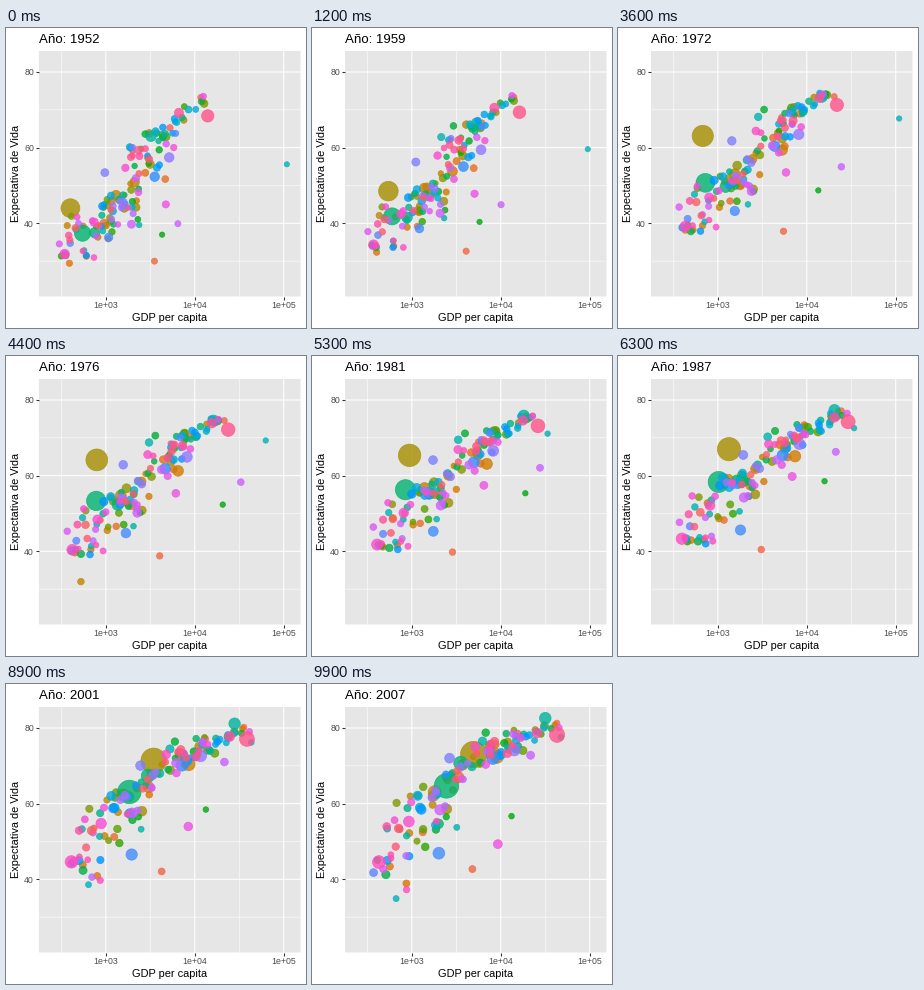
These frames come from a looping animation (300x300 px, 10000 ms). A matplotlib script:

```python
import matplotlib.pyplot as plt
import numpy as np
from matplotlib.animation import FuncAnimation

COUNTRIES, FRAMES = 142, 100
LAST = 11                      # eleven five-year rounds after 1952
PX = 0.72                      # points per pixel at 100 dpi
rng = np.random.default_rng(7)
rounds = np.arange(LAST + 1)
tracks = {}


def hcl(hue, chroma=100, lum=65, gamma=1.25):
    """Polar CIE-LUV colour as clipped RGB, darkened by the display gamma."""
    h = np.radians(hue)
    u = chroma * np.cos(h) / (13 * lum) + 0.1978
    v = chroma * np.sin(h) / (13 * lum) + 0.4683
    y = ((lum + 16) / 116) ** 3
    x, z = 9 * y * u / (4 * v), y * (12 - 3 * u - 20 * v) / (4 * v)
    rgb = np.array([3.2405 * x - 1.5371 * y - 0.4985 * z,
                    -0.9693 * x + 1.8760 * y + 0.0416 * z,
                    0.0556 * x - 0.2040 * y + 1.0572 * z]).clip(0, 1)
    srgb = np.where(rgb > 0.0031308, 1.055 * rgb ** (1 / 2.4) - 0.055, 12.92 * rgb)
    return srgb ** gamma


def diameter(pop):
    """Bubble diameter in pixels for a population in millions."""
    size = 2 + 10 * np.sqrt(pop / 1318)
    return 0.75 * (size * 2.845 + 0.945)


def store(rank, pops, at, log_gdp, life):
    tracks[rank] = (np.interp(rounds, at, log_gdp), np.interp(rounds, at, life),
                    diameter(np.geomspace(*pops, len(rounds))))


def landmark(rank, pop0, pop1, *keys):
    """A recognisable bubble; each key is (round, gdp, life)."""
    at, gdp, life = zip(*keys)
    store(rank, (pop0, pop1), at, np.log10(gdp), life)


# Giants
landmark(25, 556, 1318, (0, 400, 44), (1, 576, 50.5), (2, 488, 44.5), (3, 613, 58.4),
         (4, 677, 63.1), (6, 962, 65.5), (11, 4959, 73))
landmark(59, 372, 1110, (0, 547, 37.4), (4, 724, 50.7), (6, 856, 56.6), (9, 1459, 61.8),
         (11, 2452, 64.7))
landmark(135, 158, 301, (0, 13990, 68.4), (4, 21806, 71.3), (11, 42952, 78.2))
landmark(67, 86, 127, (0, 3217, 63), (4, 14779, 73.4), (11, 31656, 82.6))
landmark(60, 82, 224, (0, 750, 37.5), (5, 1383, 52.7), (11, 3541, 70.7))
landmark(15, 57, 190, (0, 2109, 50.9), (5, 6660, 61.5), (11, 9066, 72.4))
landmark(95, 33, 135, (0, 1077, 36.3), (5, 1700, 45), (11, 2014, 46.9))

# Loners far from the crowd
landmark(72, 0.2, 2.5, (0, 108382, 55.6), (3, 80895, 64.6), (4, 109348, 67.7),
         (6, 31354, 71.3), (11, 47307, 77.6))
landmark(108, 2.5, 8.9, (0, 493, 40), (7, 848, 44), (8, 737, 23.6), (9, 590, 36.1),
         (11, 863, 46.2))
landmark(19, 4.7, 14, (0, 368, 39.4), (3, 523, 45.4), (5, 525, 31.2), (6, 624, 51),
         (11, 1714, 59.7))
landmark(46, 0.4, 1.5, (0, 4293, 37), (3, 8359, 44.6), (5, 21746, 52.8), (8, 13522, 61.4),
         (11, 13206, 56.7))
landmark(110, 4, 27.6, (0, 6460, 39.9), (5, 34168, 58.7), (7, 21198, 66.3), (11, 21655, 72.8))
landmark(4, 4, 12, (0, 3521, 30), (4, 5473, 37.9), (6, 2757, 39.9), (11, 4797, 42.7))
landmark(118, 14, 44, (0, 4725, 45), (8, 7225, 61.9), (11, 9270, 49.3))


def crowd(ranks, growth, gdp_bands, life_bands, spread, sag=0):
    """Scatter bubbles along a band that drifts; sag lowers some lives late on."""
    at = [0, 4, 8, LAST]
    for rank, wealth in zip(ranks, np.linspace(0, 1, len(ranks))):
        health = np.clip(wealth + rng.normal(0, spread), 0, 1)
        gdp = [lo + (hi - lo) * wealth + rng.normal(0, 0.05) for lo, hi in gdp_bands]
        life = [lo + (hi - lo) * health + rng.normal(0, 0.8) for lo, hi in life_bands]
        life[-1] -= sag * rng.random() ** 3
        pop = np.clip(np.exp(rng.normal(1.7, 1.1)), 0.3, 60)
        store(rank, (pop, pop * growth), at, gdp, life)


others = rng.permutation([r for r in range(1, COUNTRIES + 1) if r not in tracks])
rich, middle, poor = np.split(others, [31, 76])

crowd(rich, 1.25, [(3.3, 4.1), (3.68, 4.3), (3.8, 4.5), (3.9, 4.65)],
      [(58, 72.5), (67, 74.5), (70.5, 77.5), (73, 81)], 0.12)
crowd(middle, 2.6, [(2.95, 3.75), (3.15, 3.9), (3.3, 4), (3.4, 4.2)],
      [(40, 64), (51, 70), (60, 74), (67, 78.5)], 0.22)
crowd(poor, 3, [(2.5, 3.35), (2.6, 3.42), (2.58, 3.4), (2.62, 3.42)],
      [(31, 46), (39, 53), (44, 61), (45, 65)], 0.3, sag=14)

# Shape: rank, (log gdp, life, diameter), round
data = np.array([tracks[r] for r in range(1, COUNTRIES + 1)])
colors = [hcl(15 + 360 * i / COUNTRIES) for i in range(COUNTRIES)]

plt.rcParams["font.family"] = "Liberation Sans"
fig = plt.figure(figsize=(3, 3), dpi=100, facecolor="white")
ax = fig.add_axes([33 / 300, 31.5 / 300, 261.5 / 300, 245.5 / 300], facecolor="#E6E6E6")
ax.patch.set_snap(False)
ax.set_xlim(2.2487, 5.1887)
ax.set_ylim(20.65, 85.55)
ax.spines[:].set_visible(False)


def grid(xs, ys, width):
    style = dict(color="white", lw=width * PX, zorder=0, snap=False)
    for x in xs:
        ax.axvline(x, **style)
    for y in ys:
        ax.axhline(y, **style)


grid([2.5, 3.5, 4.5], [30, 50, 70], 0.53)
grid([3, 4, 5], [40, 60, 80], 1.07)
ax.set_xticks([3, 4, 5], ["1e+03", "1e+04", "1e+05"])
ax.set_yticks([40, 60, 80])
ax.tick_params(length=2.75 * PX, width=1.07 * PX, pad=2.2 * PX, color="#333333",
               labelcolor="#4D4D4D", labelsize=8.8 * PX)


def label(x, y, text, size, **kw):
    return fig.text(x / 300, 1 - y / 300, text, fontsize=size * PX, color="black", **kw)


title = label(33, 15, "", 13.2, va="baseline")
label(163.8, 293, "GDP per capita", 11, ha="center", va="baseline")
label(10, 145.5, "Expectativa de Vida", 11, ha="center", va="center", rotation=90)

dots = ax.scatter(data[:, 0, 0], data[:, 1, 0], c=colors, alpha=0.8,
                  edgecolors="face", linewidths=0.71 * PX, zorder=3)


def update(frame):
    time = frame * LAST / (FRAMES - 1)
    a = min(int(time), LAST - 1)
    now = data[..., a] + (data[..., a + 1] - data[..., a]) * (time - a)
    dots.set_offsets(now[:, :2])
    dots.set_sizes((now[:, 2] * PX) ** 2)
    title.set_text(f"Año: {round(1952 + 5 * time)}")
    return dots, title


anim = FuncAnimation(fig, update, frames=FRAMES, interval=100, repeat=True, repeat_delay=0)
plt.show()
```
